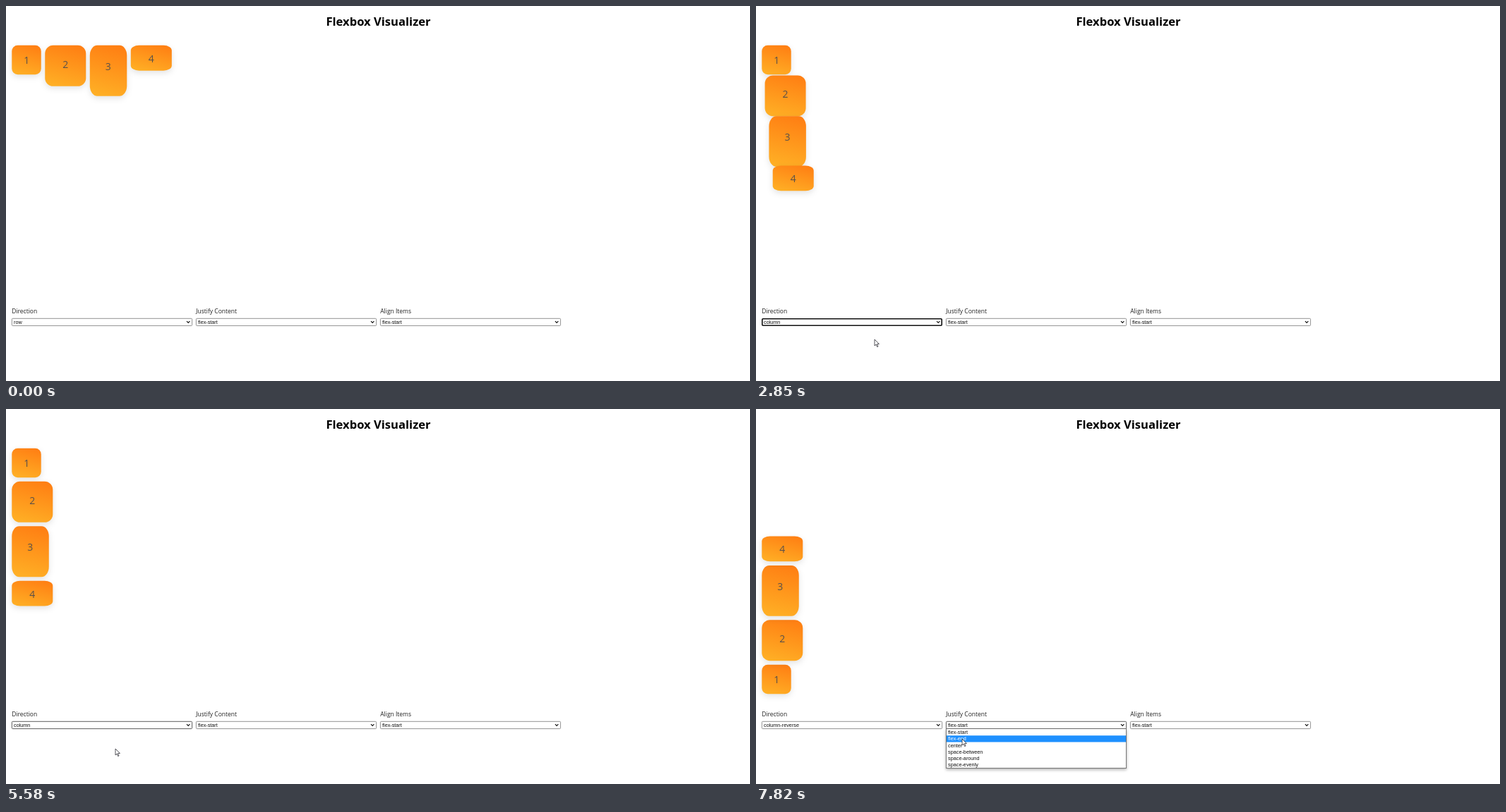
An HTML page with a canvas for the animation above (7990 ms loop, 1054 px wide and 532 px high).

```html
<!DOCTYPE html>
<html lang="en">
<head>
<meta charset="utf-8">
<title>Flexbox Visualizer</title>
<style>
  html, body { margin: 0; width: 100%; height: 100%; overflow: hidden; background: #fff; }
  canvas { display: block; width: 1054px; height: 532px; }
</style>
</head>
<body>
<canvas id="stage"></canvas>
<script>
const W = 1054, H = 532, LOOP = 7990;
const UI = '"Open Sans", "Noto Sans", sans-serif';
const FORM = '"Liberation Sans", Arial, sans-serif';
const canvas = document.getElementById('stage');
const ctx = canvas.getContext('2d');
const dpr = window.devicePixelRatio || 1;
canvas.width = W * dpr;
canvas.height = H * dpr;

const DIRECTIONS = ['row', 'row-reverse', 'column', 'column-reverse'];
const JUSTIFY = ['flex-start', 'flex-end', 'center', 'space-between', 'space-around', 'space-evenly'];

// Each choice: list click, option click, start of the box movement
const CHOICES = [
  { open: 1150, pick: 2470, glide: 2450, value: 2 },
  { open: 3800, pick: 5520, glide: 5580, value: 3 }
];
const JUSTIFY_OPEN = 7050;
const CLICKS = [...CHOICES.flatMap(c => [c.open, c.pick]), JUSTIFY_OPEN];
const PRESS = 60, SETTLE = 150, STEP = 80;

const SCALE = 0.5525, LEFT = 15 * SCALE, GAP = 10 * SCALE;
const BOXES = [
  { w: 75, h: 75, tx: 21, ty: 21.5 },
  { w: 105, h: 105, tx: 29, ty: 27 },
  { w: 95, h: 130, tx: 26, ty: 30 },
  { w: 105, h: 65, tx: 29, ty: 19 }
].map(b => ({ ...b, w: b.w * SCALE, h: b.h * SCALE }));
const AREA = { top: 55.8, bottom: 404.2 };
const FIELD = { top: 443.3, width: 255.2, height: 10.3 };
const LIST_TOP = 454, ROW = 9.25;
const fieldX = i => 8.4 + i * 261;

const clamp = v => Math.min(1, Math.max(0, v));
const lerp = (a, b, k) => a + (b - a) * k;
const during = (t, from, to) => t >= from && t < to;

function pointerAt(t) {
  const entry = clamp((t - 70) / 830);
  let x = lerp(829, 198, entry);
  let y = lerp(515, 448, entry) - 125 * Math.sin(Math.PI * entry);
  const move = (from, to, tx, ty) => {
    const k = clamp((t - from) / (to - from));
    x = lerp(x, tx, k);
    y = lerp(y, ty, k);
  };
  move(1500, 1850, 172, 466);
  move(2040, 2240, 168, 473);
  move(3170, 3640, 151, 447);
  move(3980, 4740, 155, 479);
  move(5160, 5280, 155, 482);
  move(5900, 6300, 161, 482);
  move(6310, 6910, 289, 445);
  move(7480, 7820, 292, 468);
  return { x, y };
}

function layout(direction) {
  const reverse = direction === 'column-reverse';
  let x = LEFT, y = reverse ? AREA.bottom : AREA.top;
  return BOXES.map(b => {
    if (reverse) y -= b.h;
    const place = { x, y };
    if (direction === 'row') x += b.w + GAP;
    else y += reverse ? -GAP : b.h + GAP;
    return place;
  });
}
const PLACES = ['row', 'column', 'column-reverse'].map(layout);

// Critically damped spring, advanced in screen updates
function spring(ms) {
  const u = Math.max(0, Math.floor(ms / STEP)) * STEP / 100;
  return 1 - (1 + u) * Math.exp(-u);
}

function text(str, x, y, font, color, align = 'left') {
  ctx.font = font;
  ctx.fillStyle = color;
  ctx.textAlign = align;
  ctx.fillText(str, x, y);
}

function shadow(color, blur, dy) {
  ctx.shadowColor = color;
  ctx.shadowBlur = blur * dpr;
  ctx.shadowOffsetY = dy * dpr;
}

function drawBox(box, label, x, y) {
  const { w, h } = box, sin = Math.sin(Math.PI / 12), cos = Math.cos(Math.PI / 12);
  const half = (w * sin + h * cos) / 2, cx = x + w / 2, cy = y + h / 2;
  const fill = ctx.createLinearGradient(cx - sin * half, cy + cos * half, cx + sin * half, cy - cos * half);
  fill.addColorStop(0, '#ffb226');
  fill.addColorStop(1, '#ff7c12');
  ctx.save();
  shadow('rgba(0,0,0,0.11)', 9, 3.3);
  ctx.fillStyle = fill;
  ctx.beginPath();
  ctx.roundRect(x, y, w, h, { x: w * 0.2, y: h * 0.2 });
  ctx.fill();
  ctx.restore();
  text(label, x + box.tx, y + box.ty + 5, `14px ${UI}`, '#59504a', 'center');
}

function drawBoxes(t) {
  const [first, second] = CHOICES.map(c => spring(t - c.glide));
  const [row, column, reverse] = PLACES;
  const blend = (i, axis) =>
    lerp(lerp(row[i][axis], column[i][axis], first), reverse[i][axis], second);
  BOXES.forEach((box, i) => drawBox(box, i + 1, blend(i, 'x'), blend(i, 'y')));
}

function drawField(x, label, value, state) {
  const { top, width, height } = FIELD;
  const inset = state === 'ring' ? 0.4 : 0;
  text(label, x - 0.2, 435.5, `8.5px ${UI}`, '#222');
  ctx.beginPath();
  ctx.roundRect(x + inset, top + inset, width - 2 * inset, height - 2 * inset, 1.2);
  ctx.strokeStyle = { idle: '#767676', dark: '#333', ring: '#101010' }[state];
  ctx.lineWidth = state === 'ring' ? 1.6 : 0.8;
  ctx.stroke();
  text(value, x + 2.6, 451, `7.25px ${FORM}`, '#111');
  ctx.beginPath();
  ctx.moveTo(x + 247.6, 447.2);
  ctx.lineTo(x + 249.8, 449.4);
  ctx.lineTo(x + 252, 447.2);
  ctx.strokeStyle = '#111';
  ctx.lineWidth = 1.2;
  ctx.stroke();
}

function drawList(x, options, selected, pointer) {
  const height = options.length * ROW;
  const over = Math.floor((pointer.y - LIST_TOP) / ROW);
  const active = over >= 0 ? over : selected;
  ctx.save();
  shadow('rgba(0,0,0,0.3)', 4, 1.5);
  ctx.fillStyle = '#fff';
  ctx.fillRect(x, LIST_TOP - 0.5, FIELD.width, height + 1);
  ctx.restore();
  options.forEach((name, i) => {
    const y = LIST_TOP + i * ROW;
    if (i === active) {
      ctx.fillStyle = '#1e90ff';
      ctx.fillRect(x, y, FIELD.width, ROW);
    }
    text(name, x + 2.7, y + 7, `7.25px ${FORM}`, i === active ? '#fff' : '#111');
  });
  ctx.strokeStyle = '#666';
  ctx.lineWidth = 0.9;
  ctx.strokeRect(x, LIST_TOP - 0.5, FIELD.width, height + 0.5);
}

function drawPointer({ x, y }, pressed) {
  if (pressed) {
    ctx.fillStyle = 'rgba(250,238,50,0.75)';
    ctx.beginPath();
    ctx.arc(x, y, 7, 0, Math.PI * 2);
    ctx.fill();
  }
  ctx.save();
  ctx.translate(x, y);
  ctx.fillStyle = '#fff';
  ctx.strokeStyle = '#2b2b33';
  ctx.lineWidth = 0.8;
  const arrow = new Path2D('M0 0V9L2.1 7.1L3.6 10.6L5 10L3.5 6.6L6.4 6.5Z');
  ctx.fill(arrow);
  ctx.stroke(arrow);
  ctx.restore();
}

function draw(t) {
  const pointer = pointerAt(t);
  const hovers = x => pointer.x >= x && pointer.x <= x + FIELD.width &&
    pointer.y >= FIELD.top && pointer.y <= FIELD.top + FIELD.height;
  const [firstX, secondX, thirdX] = [0, 1, 2].map(fieldX);
  const chosen = CHOICES.filter(c => t >= c.pick + SETTLE).pop();
  const selected = chosen ? chosen.value : 0;
  const directionOpen = CHOICES.some(c => during(t, c.open + PRESS, c.pick + PRESS));
  const closing = CHOICES.some(c => during(t, c.open, c.pick + SETTLE));
  const ring = chosen && !closing && t < JUSTIFY_OPEN;
  const directionState = ring ? 'ring' : closing || hovers(firstX) ? 'dark' : 'idle';
  const justifyState = t >= JUSTIFY_OPEN || hovers(secondX) ? 'dark' : 'idle';

  ctx.setTransform(dpr, 0, 0, dpr, 0, 0);
  ctx.fillStyle = '#fff';
  ctx.fillRect(0, 0, W, H);
  text('Flexbox Visualizer', W / 2 + 0.5, 28, `bold 16.6px ${UI}`, '#000', 'center');
  drawBoxes(t);
  drawField(firstX, 'Direction', DIRECTIONS[selected], directionState);
  drawField(secondX, 'Justify Content', 'flex-start', justifyState);
  drawField(thirdX, 'Align Items', 'flex-start', 'idle');
  if (directionOpen) drawList(firstX, DIRECTIONS, selected, pointer);
  if (t >= JUSTIFY_OPEN + PRESS) drawList(secondX, JUSTIFY, 0, pointer);
  if (t >= 70) drawPointer(pointer, CLICKS.some(c => during(t, c, c + PRESS)));
}

const start = performance.now();
function tick() {
  draw((performance.now() - start) % LOOP);
  requestAnimationFrame(tick);
}
tick();
</script>
</body>
</html>
```
